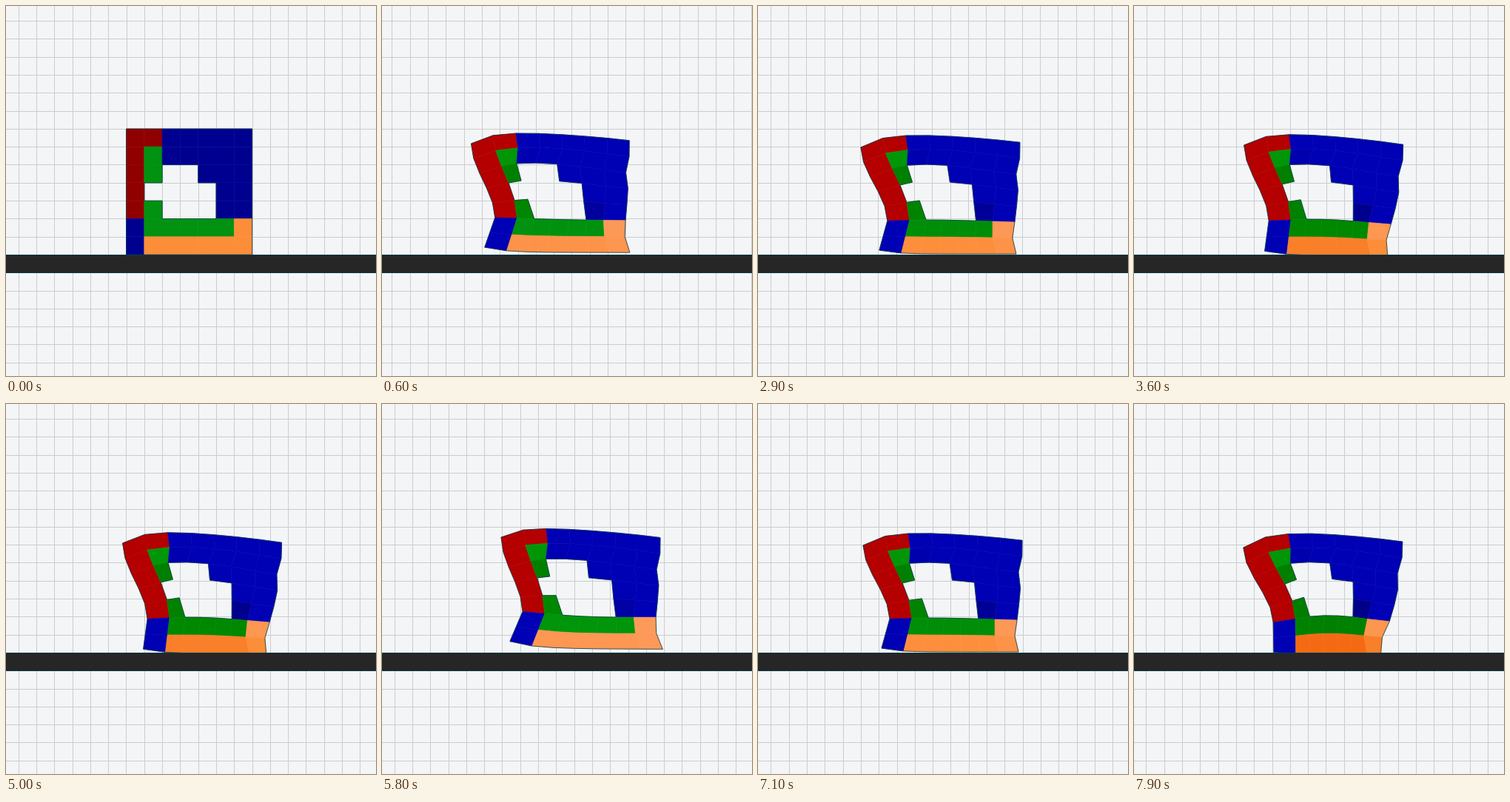
Recreate the animation shown at these times as an HTML page with a canvas. Size 500 by 500 pixels, loop 8 s.

```html
<!DOCTYPE html>
<html lang="en">
<head>
<meta charset="utf-8">
<title>Soft voxel walker</title>
<style>
html, body { margin: 0; width: 100%; height: 100%; overflow: hidden; background: #f3f5f7; }
canvas { display: block; width: 500px; height: 500px; }
</style>
</head>
<body>
<canvas id="stage" width="500" height="500"></canvas>
<script>
const ctx = document.getElementById('stage').getContext('2d');
const { PI, sin, cos, exp, min, max } = Math;
const LOOP = 8000, STEP = 100;
const CELL = 24.3, GRID_X = 16.7, GRID_Y = 20;
const REST_X = 162.5, REST_Y = 166;
const GROUND_Y = 336;
const STRIDE = 1400 / 3;          // one actuation cycle, ms
const DRIFT = 8.9 / 1400;         // forward speed, px per ms
const SIDE = 29.8;                // width of the stretched outer columns
const BG = '#f3f5f7', EDGE = '#0b3a48';

// r red, b blue, g green, o orange, . empty
const BODY = [
  'rrbbbbb',
  'rgbbbbb',
  'rg..bbb',
  'r....bb',
  'rg...bb',
  'bgggggo',
  'boooooo'
];

const mix = (a, b, k) => a + (b - a) * k;
const smooth = k => k * k * (3 - 2 * k);

// an outline runs from top to waist (row 5), then straight to the foot
function outline(top, waist, foot, j, ease) {
  return j <= 5 ? mix(top, waist, ease(j / 5)) : mix(waist, foot, (j - 5) / 2);
}

function rowX(i, j, a) {
  const stretch = sin(a) + 0.32 * (cos(a) - 1);
  const sway = 2.65 * (1 - cos(a)) + 1.6 * sin(a);
  const left = outline(130 + sway, 166 - 4.5 * stretch, 155 - 13 * stretch, j, smooth);
  const right = outline(345 + sway, 338 + 6.5 * stretch, 340 + 16.5 * stretch, j, k => k * k)
    - 4 * max(0, sin(PI * (j - 5) / 2));
  if (i === 0) return left;
  if (i === 7) return right;
  const from = left + SIDE;
  const to = mix(right - SIDE, mix(from, right, 5 / 6), max(0, (j - 5) / 2));
  const pinch = 1 + 0.28 * max(0, sin(PI * (j - 1) / 4)) * (j < 5);
  return mix(from, to, ((i - 1) / 5) ** pinch);
}

function rowY(i, j, a) {
  const u = i / 7;
  const top = 172 + 0.25 * i * i + 19 * exp(-1.1 * i);
  const foot = 335 - 5 * exp(-1.5 * i);
  const arch = 7 * max(0, sin(PI * j / 5)) * max(0, sin(PI * i / 6.5));
  const lean = (1 - cos(a)) / 2;
  const stretch = sin(a) + 0.32 * (cos(a) - 1);
  const tilt = lean * (3 * u - 3 * (1 - u) * (1 - j / 5)) - 5 * sin(a) * (1 - u) ** 4;
  const bulge = 3.5 * stretch * sin(PI * u) * sin(PI * (j / 7) ** 2);
  return mix(top, foot, j / 7) - arch + tilt + bulge;
}

const startPan = t => -CELL * exp(-max(0, t - 100) / 250);
const latePan = t => -24.65 * (1 - exp(-max(0, t - 6161) / 300));

function lattice(t) {
  const a = 2 * PI * (t - 100) / STRIDE;
  const settle = 1 - exp(-t / 170);
  const s = t / 220;
  const shift = DRIFT * (t - 1500) + latePan(t);
  const dip = -12 * s * exp(1 - s);
  const hop = 5 * max(0, sin(a));
  const vertex = (i, j) => ({
    x: mix(REST_X + i * CELL, rowX(i, j, a) + shift, settle) + dip,
    y: mix(REST_Y + j * CELL, rowY(i, j, a) - hop, settle)
  });
  return Array.from({ length: 8 }, (_, j) => Array.from({ length: 8 }, (_, i) => vertex(i, j)));
}

// colour follows how far a cell is stretched sideways
function shade(kind, k) {
  const d = k - 1;
  const deep = mix(144, 180, max(-0.2, min(1, d / 0.18)));
  if (kind === 'r') return `rgb(${deep},0,0)`;
  if (kind === 'b') return `rgb(0,0,${deep})`;
  if (kind === 'g') return `rgb(0,${max(122, min(164, 146 + 80 * d))},${max(0, 16 - 160 * Math.abs(d))})`;
  const g = 142 + (d > 0 ? 60 : 160) * d;
  const b = max(10, 57 + 170 * d);
  return `rgb(${253 + min(0, 40 * d)},${g},${b})`;
}

function drawGrid(t) {
  ctx.fillStyle = BG;
  ctx.fillRect(0, 0, 500, 500);
  ctx.fillStyle = '#cacccd';
  const x0 = GRID_X + startPan(t) + latePan(t);
  for (let k = -1; k < 23; k++) {
    ctx.fillRect(Math.round(x0 + k * CELL), 0, 1, 500);
    ctx.fillRect(0, Math.round(GRID_Y + k * CELL), 500, 1);
  }
}

function drawRobot(t) {
  const v = lattice(t);
  const full = (i, j) => BODY[j] && BODY[j][i] && BODY[j][i] !== '.';
  const rim = [];
  ctx.lineJoin = 'round';
  ctx.lineWidth = 0.6;
  for (let j = 0; j < 7; j++) for (let i = 0; i < 7; i++) {
    if (!full(i, j)) continue;
    const a = v[j][i], b = v[j][i + 1], c = v[j + 1][i + 1], d = v[j + 1][i];
    const width = (Math.hypot(b.x - a.x, b.y - a.y) + Math.hypot(c.x - d.x, c.y - d.y)) / 2;
    ctx.beginPath();
    for (const p of [a, b, c, d]) ctx.lineTo(p.x, p.y);
    ctx.closePath();
    ctx.fillStyle = ctx.strokeStyle = shade(BODY[j][i], width / CELL);
    ctx.fill();
    ctx.stroke();
    if (!full(i, j - 1)) rim.push([a, b]);
    if (!full(i + 1, j)) rim.push([b, c]);
    if (!full(i, j + 1)) rim.push([c, d]);
    if (!full(i - 1, j)) rim.push([d, a]);
  }
  ctx.beginPath();
  for (const [p, q] of rim) {
    ctx.moveTo(p.x, p.y);
    ctx.lineTo(q.x, q.y);
  }
  ctx.strokeStyle = EDGE;
  ctx.lineWidth = 0.8;
  ctx.stroke();
}

function drawGround() {
  ctx.fillStyle = '#262626';
  ctx.fillRect(0, GROUND_Y, 500, 25);
  ctx.fillStyle = EDGE;
  ctx.fillRect(0, GROUND_Y, 500, 1);
  ctx.fillRect(0, GROUND_Y + 24, 500, 1);
}

function draw(t) {
  drawGrid(t);
  drawRobot(t);
  drawGround();
}

const begin = performance.now();
function tick() {
  const t = (performance.now() - begin) % LOOP;
  draw(Math.floor(t / STEP) * STEP);
  requestAnimationFrame(tick);
}
draw(0);
requestAnimationFrame(tick);
</script>
</body>
</html>
```
